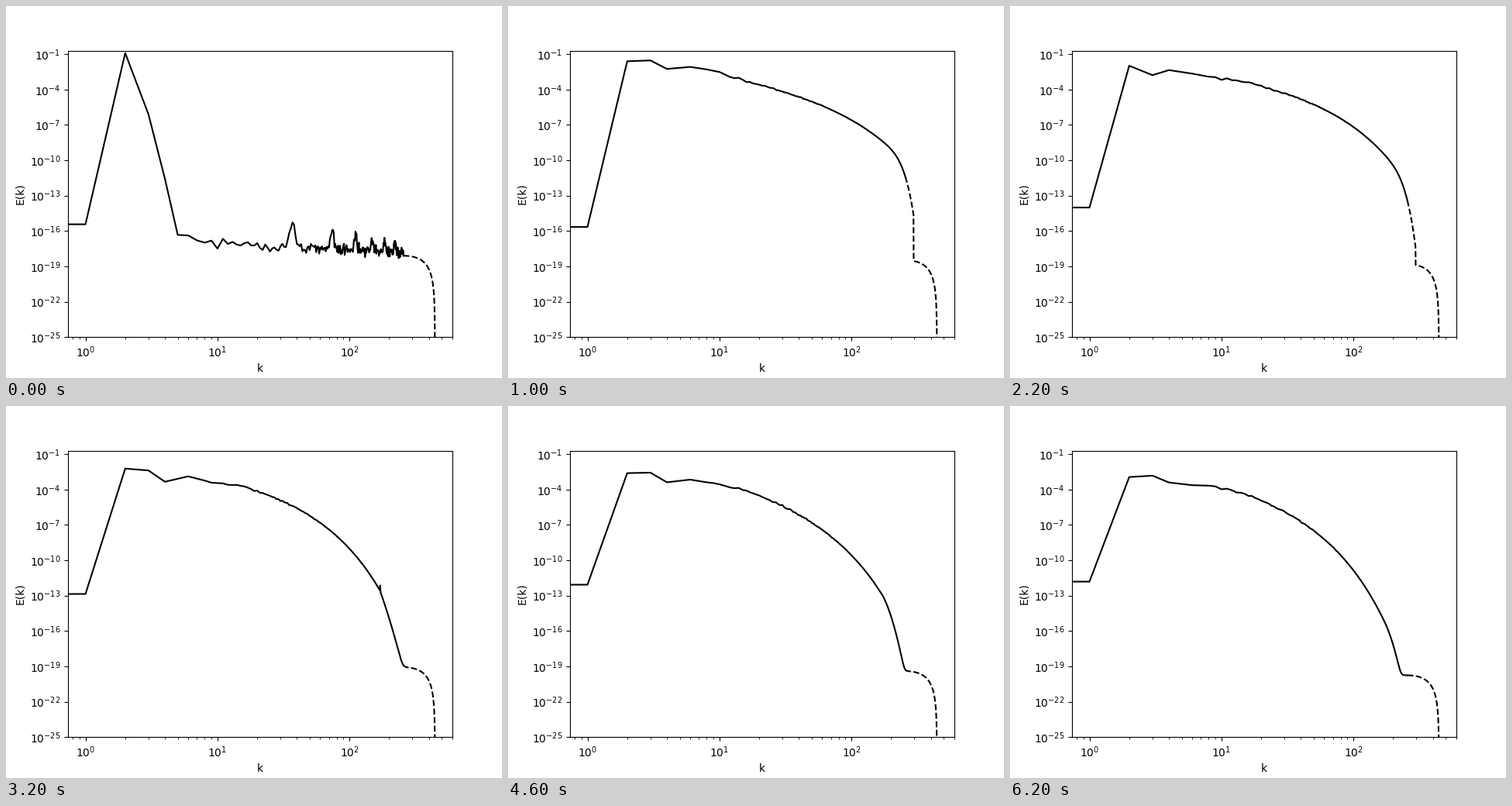
These frames come from a looping animation (640 px wide and 480 px high, 6400 ms). A matplotlib script:

```python
import numpy as np
import matplotlib.pyplot as plt
from matplotlib.animation import FuncAnimation

FRAMES, INTERVAL = 32, 200
K_SOLID, K_CUTOFF, K_DEALIAS, K_MAX = 256, 170, 295, 444
K = np.arange(1, K_MAX + 1)
LOG_K = np.log10(K)

# Key steps, with log10 E of the energetic shells and the decay law beyond them
STEPS = [5, 11, 16, 20, 31]
SHELLS = {
    1: [-15.66, -14.01, -12.86, -12.17, -11.81],
    2: [-1.60, -1.98, -2.22, -2.48, -2.94],
    3: [-1.53, -2.78, -2.38, -2.47, -2.82],
    4: [-2.25, -2.35, -3.34, -3.38, -3.40],
    6: [-2.08, -2.65, -2.88, -2.98, -3.63],
    8: [-2.29, -2.91, -3.24, -3.28, -3.67],
}
AMPLITUDE = [-3.57, -3.70, -4.13, -4.36, -4.91]
POWER = [2.33, 1.98, 1.96, 3.07, 2.55]
DECAY = [1.74, 2.62, 4.40, 3.23, 5.21]
CUT_STRENGTH = [1.8, 2.1, 3.1, 4.2, 4.0]
CUT_POWER = [3, 3, 1, 1.5, 2]


def at(step, values):
    return np.interp(step, STEPS, values)


def noise_floor(step):
    """Smooth floor that falls to zero at the corner of the wavenumber cube."""
    reach = np.clip((K - K_SOLID) / (K_MAX - K_SOLID), 0, 1)
    corner = 3 * np.log10(np.maximum(1 - reach ** 2, 1e-5))
    return -18.1 - 1.66 * (step / 31) ** 0.8 + corner


def initial_state():
    """One energetic shell over round-off noise with bumps every 37 shells."""
    rng = np.random.default_rng(11)
    log_e = -16.45 - 0.58 * LOG_K + rng.normal(0, 0.25, K.size)
    for n in range(1, 7):
        log_e += 1.95 / n ** 0.4 * np.exp(-((K - 37 * n) / (2 + 0.5 * n)) ** 2)
    log_e[:6] = [-15.43, -0.90, -6.10, -11.58, -16.33, -16.38]
    return np.where(K < K_SOLID, log_e, noise_floor(0))


INITIAL = initial_state()


def developed(step):
    log_e = (at(step, AMPLITUDE) - at(step, POWER) * (LOG_K - np.log10(20))
             - at(step, DECAY) * (K - 20) / 100)
    beyond = np.maximum(K - K_CUTOFF, 0) / 100
    log_e -= at(step, CUT_STRENGTH) * beyond ** at(step, CUT_POWER)
    # pile-up at the dealiasing cutoff
    log_e[K_CUTOFF] += max(0, 0.6 - 0.1 * abs(step - 17))

    joint = 16
    levels = [at(step, v) for v in SHELLS.values()] + [log_e[joint - 1]]
    low = np.interp(LOG_K, np.log10([*SHELLS, joint]), levels)
    log_e = np.where(K < joint, low, log_e)
    ripple = np.random.default_rng(step).normal(0, 0.08, K.size)
    return log_e + ripple * np.exp(-K / 35) * (K > 8)


def spectrum(step):
    if step == 0:
        return INITIAL
    log_e, floor = developed(step), noise_floor(step)
    if step < STEPS[0]:
        # the cascade fills ever smaller scales
        log_e -= 1.8 / 4 ** step * np.maximum(K - 2, 0)
        t = step / STEPS[0]
        log_e[:2] = (1 - t) * INITIAL[:2] + t * log_e[:2]
        floor = np.where((K > 4) & (K < K_SOLID), INITIAL, floor)
    log_e[K > K_DEALIAS] = -40
    return np.log10(10 ** log_e + 10 ** floor)


fig, ax = plt.subplots(figsize=(6.4, 4.8), dpi=100)
ax.set_xscale("log")
ax.set_yscale("log")
margin = K_MAX ** 0.05
ax.set_xlim(1 / margin, K_MAX * margin)
ax.set_ylim(1e-25, 0.2)
ax.set_xlabel("k")
ax.set_ylabel("E(k)")
solid, = ax.plot([], [], "k-")
dashed, = ax.plot([], [], "k--")


def update(step):
    energy = 10 ** spectrum(step)
    # extend the first shell past the left edge
    solid.set_data(np.r_[0.5, K[:K_SOLID]],
                   np.r_[energy[0], energy[:K_SOLID]])
    dashed.set_data(K[K_SOLID - 1:], energy[K_SOLID - 1:])
    return solid, dashed


anim = FuncAnimation(fig, update, frames=FRAMES, interval=INTERVAL,
                     repeat=True, repeat_delay=0)
plt.show()
```
